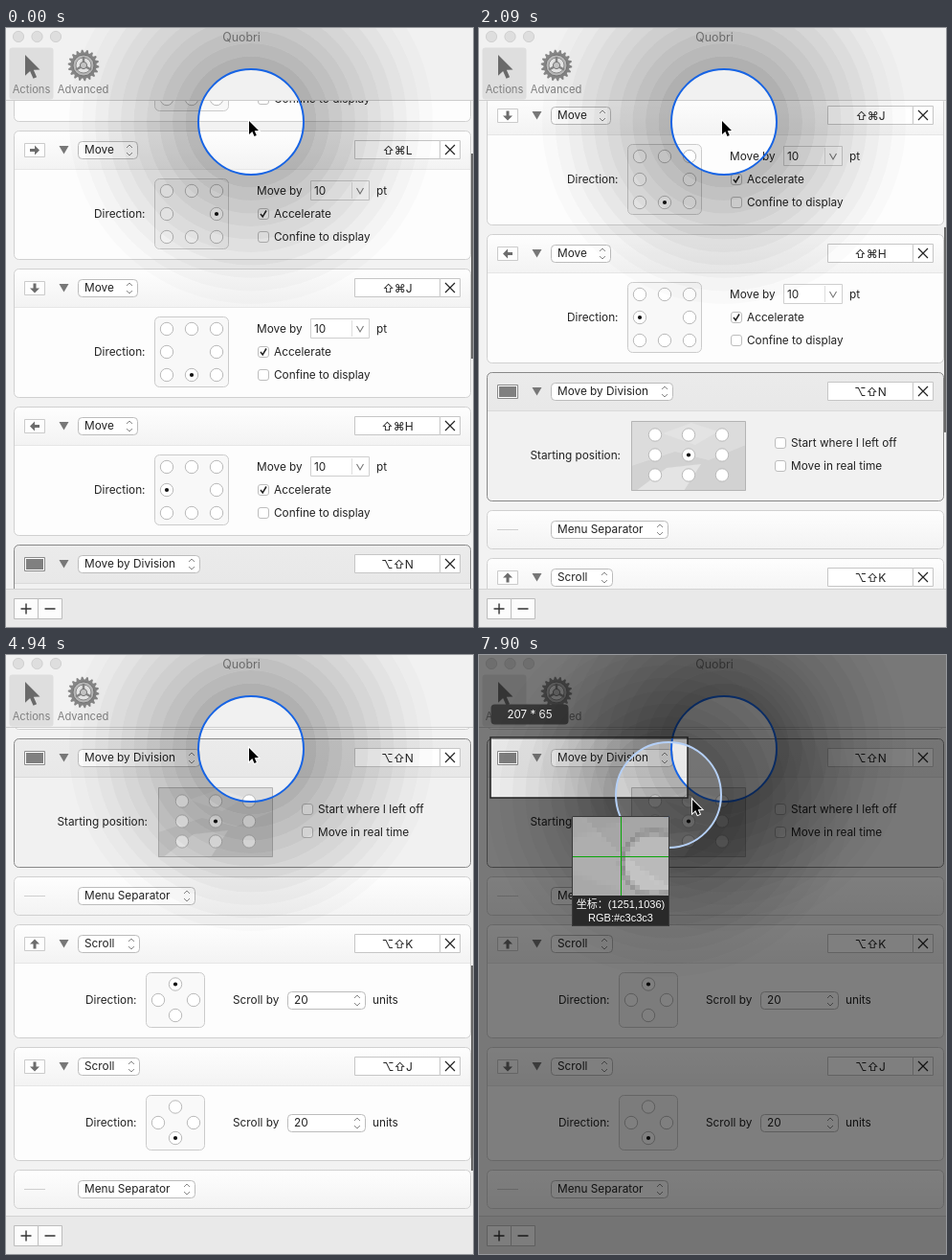
An HTML page with a canvas for the animation above (8000 ms loop, 488 by 625 pixels).

```html
<!DOCTYPE html>
<html lang="en">
<head>
<meta charset="utf-8">
<title>Actions</title>
<style>
html, body { margin: 0; width: 488px; height: 625px; overflow: hidden; background: #f2f2f2; }
canvas { display: block; }
</style>
</head>
<body>
<canvas id="stage" width="488" height="625"></canvas>
<script>
const W = 488, H = 625, LOOP = 8000;
const UI = 'Inter, "DejaVu Sans", sans-serif';
const HUD = '"Liberation Sans", "Noto Sans CJK SC", "Noto Sans CJK", sans-serif';
const stage = document.getElementById('stage').getContext('2d');
let g = stage;

// ---------- drawing helpers ----------
function text(str, x, y, { size = 11.8, color = '#222', align = 'left', font = UI } = {}) {
  g.font = `${size}px ${font}`;
  g.fillStyle = color;
  g.textAlign = align;
  g.textBaseline = 'alphabetic';
  g.fillText(str, x, y + size * 0.36);
}

function box(x, y, w, h, r, fill, stroke) {
  g.beginPath();
  g.roundRect(x + 0.5, y + 0.5, w - 1, h - 1, r);
  if (fill) { g.fillStyle = fill; g.fill(); }
  if (stroke) { g.strokeStyle = stroke; g.lineWidth = 1; g.stroke(); }
}

function lines(color, width, ...paths) {
  g.strokeStyle = color;
  g.lineWidth = width;
  g.beginPath();
  for (const path of paths) path.forEach(([x, y], i) => i ? g.lineTo(x, y) : g.moveTo(x, y));
  g.stroke();
}

function poly(color, ...points) {
  g.fillStyle = color;
  g.beginPath();
  points.forEach(([x, y]) => g.lineTo(x, y));
  g.closePath();
  g.fill();
}

function disc(x, y, r, fill, stroke, width = 1) {
  g.beginPath();
  g.arc(x, y, r, 0, Math.PI * 2);
  if (fill) { g.fillStyle = fill; g.fill(); }
  if (stroke) { g.strokeStyle = stroke; g.lineWidth = width; g.stroke(); }
}

function pointer(x, y, scale, fill, edge) {
  g.save();
  g.translate(x, y);
  g.scale(scale, scale);
  g.beginPath();
  [[0, 0], [0, 14], [3.3, 11], [5.5, 16], [7.8, 15], [5.7, 10.2], [10, 10]].forEach(p => g.lineTo(...p));
  g.closePath();
  if (edge) { g.strokeStyle = edge; g.lineWidth = 2; g.stroke(); }
  g.fillStyle = fill;
  g.fill();
  g.restore();
}

// ---------- controls ----------
function radio(x, y, on) {
  disc(x, y, 6.7, '#fff', '#b9b9b9');
  if (on) disc(x, y, 2.1, '#111');
}

function checkbox(x, y, label, on) {
  box(x, y - 6, 12, 12, 2.5, '#fff', '#bdbdbd');
  if (on) lines('#222', 1.5, [[x + 3, y], [x + 5.2, y + 3], [x + 9, y - 3.5]]);
  text(label, x + 17, y);
}

function popup(x, y, w, label) {
  box(x, y - 9, w, 19, 4, '#fff', '#bcbcbc');
  text(label, x + 7, y);
  const c = x + w - 9;
  lines('#8a8a8a', 1, [[c - 3, y - 2], [c, y - 5], [c + 3, y - 2]], [[c - 3, y + 3], [c, y + 6], [c + 3, y + 3]]);
}

function actionIcon(y, dir) {
  if (dir === 'screen') {
    box(19, y - 7, 22, 15, 0, '#fff', '#8a8a8a');
    g.fillStyle = '#808080';
    g.fillRect(21, y - 5, 18, 11);
    return;
  }
  box(19, y - 7, 22, 15, 0, '#fdfdfd', '#cbcbcb');
  g.save();
  g.translate(30, y + 0.5);
  g.rotate({ right: 0, down: 1, left: 2, up: 3 }[dir] * Math.PI / 2);
  poly('#6c6c6c', [-5, -1.5], [0, -1.5], [0, -5], [5, 0], [0, 5], [0, 1.5], [-5, 1.5]);
  g.restore();
}

// ---------- cards ----------
function card(y, h, selected) {
  box(8, y, 478, h, 5, selected ? '#f1f1f1' : '#fdfdfd', null);
  const head = g.createLinearGradient(0, y, 0, y + 40);
  head.addColorStop(0, selected ? '#ebebeb' : '#fefefe');
  head.addColorStop(1, selected ? '#e8e8e8' : '#f3f3f3');
  g.fillStyle = head;
  g.beginPath();
  g.roundRect(8.5, y + 0.5, 477, 39.5, h > 41 ? [5, 5, 0, 0] : 5);
  g.fill();
  if (h > 41) lines(selected ? '#dadada' : '#e6e6e6', 1, [[9, y + 40.5], [485, y + 40.5]]);
  box(8, y, 478, h, 5, null, selected ? '#898989' : '#d0d0d0');
}

function header(y, name, width, icon, keys) {
  const m = y + 20;
  actionIcon(m, icon);
  poly('#777', [55.5, m - 4], [65.5, m - 4], [60.5, m + 4.5]);
  popup(75, m, width, name);
  box(364, m - 10, 90, 20, 0, '#fff', '#c6c6c6');
  box(453, m - 10, 22, 20, 0, '#fff', '#c6c6c6');
  text(keys, 409, m + 0.3, { align: 'center', size: 12 });
  lines('#222', 1.2, [[459, m - 5], [469, m + 5]], [[469, m - 5], [459, m + 5]]);
}

function moveCard(y, dir, key) {
  card(y, 135);
  header(y, 'Move', 63, dir, '⇧⌘' + key);
  text('Direction:', 145.5, y + 87, { align: 'right' });
  box(155, y + 50, 78, 74, 5, '#f8f8f8', '#cbcbcb');
  const [dx, dy] = { up: [0, -1], down: [0, 1], left: [-1, 0], right: [1, 0] }[dir];
  for (let j = -1; j <= 1; j++)
    for (let i = -1; i <= 1; i++)
      if (i || j) radio(194 + 26 * i, y + 87 + 24 * j, i === dx && j === dy);
  text('Move by', 262, y + 63);
  box(318, y + 52, 62, 21, 0, '#fff', '#cfcfcf');
  text('10', 322, y + 63);
  lines('#dedede', 1, [[361.5, y + 54], [361.5, y + 71]]);
  lines('#777', 1.1, [[366.5, y + 60], [370, y + 66], [373.5, y + 60]]);
  text('pt', 387, y + 63);
  checkbox(263, y + 87, 'Accelerate', true);
  checkbox(263, y + 111, 'Confine to display', false);
}

function divisionCard(y) {
  card(y, 135, true);
  header(y, 'Move by Division', 128, 'screen', '⌥⇧N');
  text('Starting position:', 148, y + 87, { align: 'right' });
  g.save();
  g.beginPath();
  g.rect(159, y + 51, 120, 73);
  g.clip();
  g.fillStyle = '#dcdcdc';
  g.fillRect(159, y + 51, 120, 73);
  poly('#d2d2d2', [159, y + 98], [205, y + 83], [240, y + 92], [279, y + 76], [279, y + 124], [159, y + 124]);
  poly('#e4e4e4', [164, y + 124], [196, y + 100], [232, y + 96], [214, y + 124]);
  poly('#e3e3e3', [192, y + 64], [222, y + 53], [250, y + 62], [226, y + 76]);
  g.restore();
  box(159, y + 51, 120, 73, 0, null, '#b4b4b4');
  for (let j = -1; j <= 1; j++)
    for (let i = -1; i <= 1; i++) radio(219 + 35 * i, y + 86.5 + 21 * j, !i && !j);
  checkbox(309, y + 74, 'Start where I left off', false);
  checkbox(309, y + 98, 'Move in real time', false);
}

function separatorCard(y) {
  card(y, 41);
  lines('#cfcfcf', 1, [[19, y + 20.5], [41, y + 20.5]]);
  popup(75, y + 20, 123, 'Menu Separator');
}

function scrollCard(y, dir, key) {
  card(y, 119);
  header(y, 'Scroll', 65, dir, '⌥⇧' + key);
  text('Direction:', 136.5, y + 79, { align: 'right' });
  box(146, y + 50, 62, 58, 5, '#f9f9f9', '#cbcbcb');
  radio(177, y + 62.5, dir === 'up');
  radio(159, y + 79, false);
  radio(196, y + 79, false);
  radio(177, y + 95, dir === 'down');
  text('Scroll by', 237, y + 79);
  popup(294, y + 79, 82, '20');
  text('units', 383, y + 79);
}

// ---------- window ----------
function toolbar() {
  g.fillStyle = '#f1f1f1';
  g.fillRect(0, 0, W, 76);
  g.fillStyle = '#cdcdcd';
  g.fillRect(0, 75, W, 1);
  for (const x of [13, 32.5, 52]) disc(x, 9, 5.6, '#dedede', '#d0d0d0');
  text('Quobri', 246, 9.5, { size: 12.4, align: 'center', color: '#858585' });
  box(3, 20, 47, 55, 3, '#dedede', null);
  pointer(20, 28, 1.55, '#6a6a6a');
  const label = { size: 11.2, align: 'center', color: '#808080' };
  text('Actions', 26.5, 64, label);
  text('Advanced', 80.5, 64, label);
  gear(81, 39);
}

function gear(x, y) {
  const teeth = 18;
  g.beginPath();
  for (let i = 0; i < teeth * 4; i++) {
    const a = (i + 0.5) / (teeth * 4) * Math.PI * 2;
    const r = i % 4 < 2 ? 16.3 : 13.6;
    g.lineTo(x + r * Math.cos(a), y + r * Math.sin(a));
  }
  g.closePath();
  g.fillStyle = '#868686';
  g.fill();
  disc(x, y, 11, '#b9b9b9', '#747474');
  disc(x, y, 8, '#e6e6e6', '#8a8a8a');
  for (let i = 0; i < 3; i++) {
    const a = Math.PI / 6 + i * Math.PI * 2 / 3;
    lines('#858585', 2.5, [[x, y], [x + 9 * Math.cos(a), y + 9 * Math.sin(a)]]);
  }
  disc(x, y, 3.6, '#c6c6c6', '#747474');
}

function bottomBar() {
  g.fillStyle = '#e9e9e9';
  g.fillRect(0, 585, W, 40);
  g.fillStyle = '#d3d3d3';
  g.fillRect(0, 585, W, 1);
  box(8, 595, 26, 22, 0, '#fcfcfc', '#bdbdbd');
  box(33, 595, 26, 22, 0, '#fcfcfc', '#bdbdbd');
  lines('#333', 1.4, [[15.5, 606], [26.5, 606]], [[21, 600.5], [21, 611.5]], [[40.5, 606], [51.5, 606]]);
}

function appWindow(scroll, barAlpha) {
  g.fillStyle = '#f2f2f2';
  g.fillRect(0, 0, W, H);
  g.save();
  g.beginPath();
  g.rect(0, 76, W, 509);
  g.clip();
  g.translate(0, -scroll);
  moveCard(-37, 'up', 'K');
  moveCard(107, 'right', 'L');
  moveCard(251, 'down', 'J');
  moveCard(395, 'left', 'H');
  divisionCard(539);
  separatorCard(683);
  scrollCard(733, 'up', 'K');
  scrollCard(861, 'down', 'J');
  separatorCard(989);
  g.restore();
  toolbar();
  bottomBar();
  g.fillStyle = `rgba(70,70,70,${0.8 * barAlpha})`;
  g.fillRect(486, 131 + scroll * 0.427, 2, 214);
}

// Banded shade around a clear disc.
function spotlight(x, y, color) {
  const bands = 10, inner = 55, reach = 135;
  for (let i = 0; i < bands; i++) {
    const from = inner + reach * i / bands;
    g.beginPath();
    g.arc(x, y, from + reach / bands, 0, Math.PI * 2);
    g.arc(x, y, from, 0, Math.PI * 2, true);
    g.fillStyle = `rgba(0,0,0,${0.27 * Math.pow(1 - i / bands, 1.25)})`;
    g.fill();
  }
  disc(x, y, inner, null, color, 2);
}

const cursor = (x, y) => pointer(x, y, 1, '#000', '#fff');

// ---------- motion ----------
function track(keys, t) {
  let i = 1;
  while (i < keys.length - 1 && keys[i][0] < t) i++;
  const a = keys[i - 1], b = keys[i];
  const k = Math.min(1, Math.max(0, (t - a[0]) / (b[0] - a[0])));
  return a.slice(1).map((v, n) => v + (b[n + 1] - v) * k);
}

const scrollKeys = [[0, 0], [740, 79], [2090, 180], [3740, 367], [4940, 452]];
// time, probe x y, cursor x y, ring x y
const mouseKeys = [
  [5990, 254, 98, 254, 97, 256, 98],
  [6583, 170, 106, 130, 112, 200, 103],
  [6729, 97, 115, 62, 119, 111, 113],
  [6875, 35, 105, 18, 95, 50, 110],
  [7022, 14, 88, 12, 86, 18, 92],
  [7314, 12, 86, 12, 86, 12, 86],
  [7899, 212, 151, 223, 151, 198, 146]
];
const END = 452, CAPTURE = 5990, MOVE = 6583, DRAG = 7314, STOP = 7899;
const BLUE = '#1764e4', PRESSED = '#b5d0f7';

const snap = (t, start, step) => start + Math.floor((t - start) / step) * step;

// ---------- screen capture ----------
const shot = document.createElement('canvas');
shot.width = W;
shot.height = H;

function takeShot() {
  g = shot.getContext('2d');
  appWindow(END, 0);
  spotlight(256, 98, BLUE);
  g = stage;
}

function magnifier(px, py) {
  const x = Math.round(px) - 115, y = Math.round(py) + 17, w = 102, h = 83, zoom = 5;
  g.save();
  g.beginPath();
  g.rect(x, y, w, h);
  g.clip();
  g.imageSmoothingEnabled = false;
  g.translate(x + 51, y + 42);
  g.scale(zoom, zoom);
  g.drawImage(shot, -Math.round(px), -Math.round(py));
  g.restore();
  g.fillStyle = '#0aa60a';
  g.fillRect(x, y + 42, w, 1);
  g.fillRect(x + 51, y, 1, h);
  g.fillStyle = '#292929';
  g.fillRect(x, y + h, w, 32);
  box(x, y, w, 115, 0, null, '#3a3a3a');
  const style = { size: 11, align: 'center', color: '#fff', font: HUD };
  const shade = py > 130 ? '#c3c3c3' : '#dfe0df';
  text(`坐标：(${Math.round(px) + 1039},${1187 - Math.round(py)})`, x + 51, y + 92, style);
  text(`RGB:${shade}`, x + 51, y + 106, style);
}

function selection(k) {
  const x = 12, y = 86, w = Math.round(206 * k), h = Math.round(63 * k);
  g.fillStyle = 'rgba(0,0,0,0.5)';
  g.fillRect(0, 0, W, H);
  if (w && h) {
    g.drawImage(shot, x, y, w, h, x, y, w, h);
    g.strokeStyle = '#222';
    g.lineWidth = 1.5;
    g.strokeRect(x, y, w, h);
  }
  box(12, 51, 82, 22, 4, '#383838', null);
  text(`${Math.round(207 * k)} * ${Math.round(65 * k)}`, 53, 62, { align: 'center', color: '#fff', size: 11.6 });
}

function capture(t) {
  const time = t < MOVE ? CAPTURE : Math.min(STOP, snap(t, MOVE, 146.25));
  const [px, py, cx, cy, rx, ry] = track(mouseKeys, time);
  const dragging = time >= DRAG;
  g.drawImage(shot, 0, 0);
  if (dragging) selection((time - DRAG) / (STOP - DRAG));
  else {
    g.fillStyle = 'rgba(0,0,0,0.035)';
    g.fillRect(0, 0, W, H);
  }
  spotlight(rx, ry, dragging ? PRESSED : BLUE);
  magnifier(px, py);
  cursor(cx, cy);
}

function browse(t) {
  const time = t < 740 ? snap(t, 0, 150) : snap(t, 740, 150);
  const fade = t < 5390 ? 1 : t < 5540 ? 0.5 : 0;
  appWindow(Math.round(track(scrollKeys, time)[0]), fade);
  spotlight(256, 98, BLUE);
  cursor(254, 97);
}

takeShot();
function frame(now) {
  const t = now % LOOP;
  if (t < CAPTURE) browse(t);
  else capture(t);
  requestAnimationFrame(frame);
}
frame(0);
</script>
</body>
</html>
```
